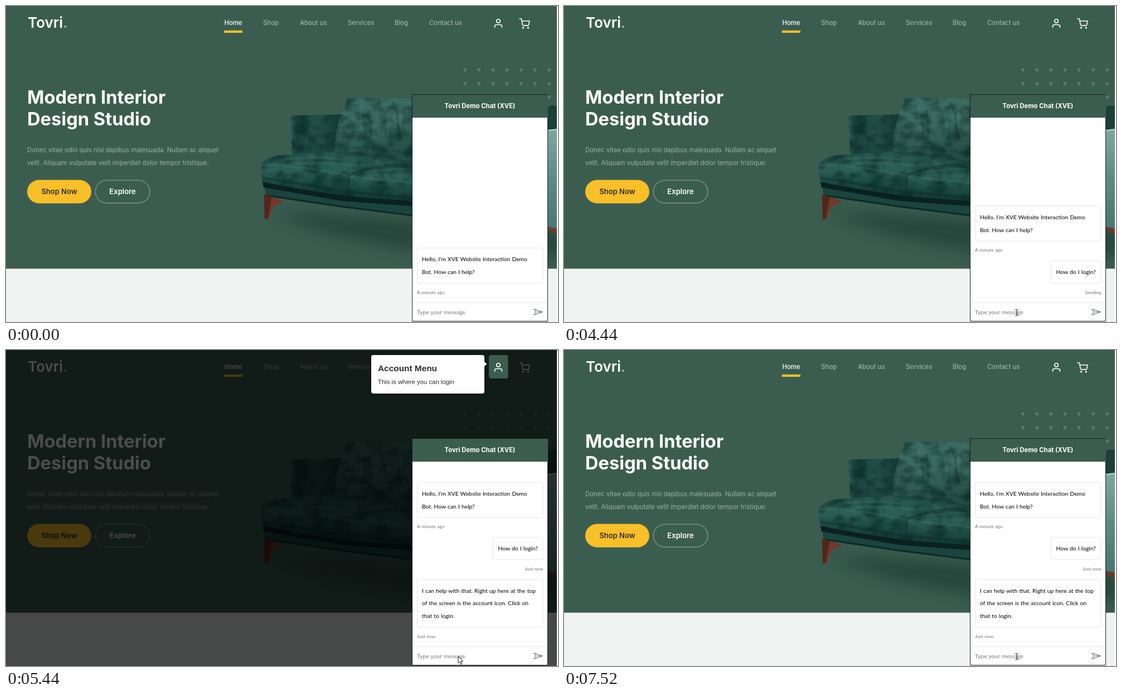
Recreate the animation shown at these times as an HTML page. Size 990x566 px, loop 8000 ms.

```html
<!DOCTYPE html>
<html lang="en">
<head>
<meta charset="utf-8">
<title>Website chat demo</title>
<style>
html, body { margin: 0; width: 100%; height: 100%; overflow: hidden; background: #fff; }
svg { display: block; width: 990px; height: 566px; }
text { white-space: pre; }
.site { font: 400 11.35px Inter, sans-serif; fill: #fff; }
.site .nav { font-weight: 500; }
.site .button { font-size: 13px; font-weight: 600; text-anchor: middle; }
.site .headline { font-size: 32.65px; font-weight: 700; }
.site .logo { font-size: 26px; font-weight: 600; }
.half { opacity: .5; }
.icon { fill: none; stroke: #fff; stroke-width: 2; stroke-linecap: round; stroke-linejoin: round; }
.popover { font: 11.35px "Liberation Sans", Arial, sans-serif; fill: #2d2d2d; filter: drop-shadow(0 1px 4px #0006); }
.chat { font: 10.3px Lato, sans-serif; word-spacing: .5px; }
.chat .title { font: 700 11.35px Inter, sans-serif; fill: #fff; text-anchor: middle; word-spacing: 0; }
.chat .time { font-size: 8.4px; fill: #6c726e; }
.chat .right { text-anchor: end; }
.chat .bubble { fill: #fff; stroke: #e6e6e6; }
.wrinkles { fill: none; stroke-linecap: round; filter: url(#soft); }
</style>
</head>
<body>
<svg viewBox="0 0 990 566">
  <defs>
    <linearGradient id="back" x1="0" y1="0" x2=".25" y2="1">
      <stop stop-color="#396960"/><stop offset=".45" stop-color="#3d6c62"/><stop offset="1" stop-color="#224c45"/>
    </linearGradient>
    <linearGradient id="arm" x1="0" x2="1">
      <stop stop-color="#2c5c54"/><stop offset=".12" stop-color="#1c463f"/><stop offset=".6" stop-color="#225048"/><stop offset="1" stop-color="#153631"/>
    </linearGradient>
    <linearGradient id="seat" x1="0" y1="0" x2="0" y2="1">
      <stop stop-color="#25544c"/><stop offset=".4" stop-color="#2c5f56"/><stop offset=".62" stop-color="#1f4e47"/><stop offset="1" stop-color="#133935"/>
    </linearGradient>
    <linearGradient id="rightArm" x1="0" y1="0" x2="0" y2="1">
      <stop stop-color="#7fa5a1"/><stop offset=".5" stop-color="#5d8a85"/><stop offset="1" stop-color="#4a7771"/>
    </linearGradient>
    <filter id="soft" x="-20%" y="-20%" width="140%" height="140%"><feGaussianBlur stdDeviation="1.3"/></filter>
    <filter id="blur" x="-30%" y="-60%" width="160%" height="220%"><feGaussianBlur stdDeviation="13"/></filter>
    <filter id="velvet" x="0" y="0" width="100%" height="100%" color-interpolation-filters="sRGB">
      <feTurbulence type="fractalNoise" baseFrequency=".035 .05" numOctaves="3" seed="4"/>
      <feColorMatrix values="0 0 0 0 .03  0 0 0 0 .15  0 0 0 0 .14  1.6 0 0 0 -.62"/>
      <feComposite in2="SourceAlpha" operator="in" result="nap"/>
      <feMerge><feMergeNode in="SourceGraphic"/><feMergeNode in="nap"/></feMerge>
    </filter>
    <clipPath id="hero"><path d="M0 0H988V470.500H0z"/></clipPath>
  </defs>

  <g class="site">
    <path fill="#eff2f1" d="M0 470H988V566H0z"/>
    <path fill="#3b5d50" d="M0 0H988V470.500H0z"/>
    <g id="dots" fill="#fff" fill-opacity=".17"></g>

    <g clip-path="url(#hero)">
      <path d="M470 368L600 374 1000 400V448L740 442 580 410z" fill="#1f3a33" opacity=".62" filter="url(#blur)"/>
      <path d="M463 323L600 344 735 358V377L600 360 466 340z" fill="#1a443e"/>
      <path d="M465 339L600 359 735 376" fill="none" stroke="#0d2926" stroke-width="3"/>
      <path d="M459 312L614 336 735 346V359L600 349 462 325z" fill="#0a211f"/>
      <g filter="url(#velvet)">
        <path d="M510 200Q511 195 520 196L604 194 592 264 513 270z" fill="url(#arm)"/>
        <path d="M612 165Q660 163 735 167V282L640 266 589 262Q590 226 600 198 607 178 612 165z" fill="url(#back)"/>
        <path d="M614 306Q640 291 735 280V350L614 341z" fill="url(#seat)"/>
        <path d="M457 284Q464 272 490 267L590 261 640 265 725 280Q660 287 614 304L615 341Q530 329 459 315z" fill="url(#seat)"/>
      </g>
      <g class="wrinkles">
        <path d="M640 170Q632 205 640 226M672 172Q690 190 684 235M712 178Q700 210 716 240" stroke="#6a978b" stroke-width="3" opacity=".2"/>
        <path d="M606 258Q640 246 728 266M650 188Q656 214 652 238M694 174Q706 196 704 220M593 262L640 266 735 281M604 196Q594 222 590 260" stroke="#123630" stroke-width="2.500" opacity=".5"/>
        <path d="M458 285Q530 285 614 304M616 305Q670 310 735 318" stroke="#55857a" stroke-width="3" opacity=".3"/>
        <path d="M615 304V341M614 304Q650 287 725 281M461 308Q540 320 610 333M620 333Q680 340 735 343" stroke="#0b2b28" stroke-width="2.500" opacity=".7"/>
        <path d="M490 276Q550 268 600 274M520 283Q560 278 630 286M650 298Q690 290 730 293" stroke="#507f75" stroke-width="4" opacity=".25"/>
      </g>
      <path d="M463 337L500 350Q481 355 476 366L472 382H464z" fill="#70392a"/>
      <path d="M463 337L477 342 469 382H464z" fill="#532619"/>
      <path d="M970 182Q980 175 988 180V400L970 394z" fill="#1b3f39"/>
      <path d="M970 222H988V400L970 395z" fill="url(#rightArm)"/>
      <path d="M970 223L988 221" stroke="#c3d6d2" stroke-width="2"/>
      <path d="M970 395L988 399V410L970 399z" fill="#70392a"/>
    </g>

    <text class="logo" x="39" y="38.7">Tovri<tspan fill-opacity=".5">.</tspan></text>
    <g class="nav">
      <text x="391.5" y="34.3">Home</text>
      <path fill="#f9bf29" d="M391 43.800H424V48H391z"/>
      <g class="half">
        <text x="461" y="34.3">Shop</text>
        <text x="527" y="34.3">About us</text>
        <text x="613" y="34.3">Services</text>
        <text x="697" y="34.3">Blog</text>
        <text x="759" y="34.3">Contact us</text>
      </g>
    </g>
    <g class="icon">
      <g transform="translate(873.3 21.3) scale(.81)">
        <path d="M20 21v-2a4 4 0 0 0-4-4H8a4 4 0 0 0-4 4v2"/><circle cx="12" cy="7" r="4"/>
      </g>
      <g transform="translate(920.2 21.9) scale(.81)">
        <path d="M1 1h4l2.68 13.39a2 2 0 0 0 2 1.61h9.72a2 2 0 0 0 2-1.61L23 6H6"/>
        <circle cx="9" cy="21" r="1"/><circle cx="20" cy="21" r="1"/>
      </g>
    </g>
    <text class="headline" x="38" y="175">Modern Interior</text>
    <text class="headline" x="38" y="214">Design Studio</text>
    <g class="half">
      <text x="38" y="262">Donec vitae odio quis nisl dapibus malesuada. Nullam ac aliquet</text>
      <text x="38" y="284.7">velit. Aliquam vulputate velit imperdiet dolor tempor tristique.</text>
    </g>
    <rect x="38" y="311.6" width="115" height="41.8" rx="20.9" fill="#f9bf29"/>
    <text class="button" x="95.5" y="337.3" fill="#2f2f2f">Shop Now</text>
    <rect x="160.3" y="312.3" width="97.6" height="40.6" rx="20.3" fill="none" stroke="#fff" stroke-opacity=".3" stroke-width="1.6"/>
    <text class="button" x="209" y="337.3">Explore</text>
  </g>

  <path id="overlay" fill-rule="evenodd" fill-opacity=".7" d="M0 0H988V566H0zM870 9h26.500a4 4 0 0 1 4 4v34a4 4 0 0 1-4 4H870a4 4 0 0 1-4-4V13a4 4 0 0 1 4-4z"/>

  <g id="popover" class="popover">
    <rect x="655" y="9" width="203" height="69" rx="4" fill="#fff"/>
    <path d="M858 21l4.500 4-4.500 4z" fill="#fff"/>
    <text x="667" y="37.600" font-size="15.4" font-weight="700">Account Menu</text>
    <text x="667" y="61">This is where you can login</text>
  </g>

  <g class="chat">
    <path fill="#fff" stroke="#000" stroke-width=".85" d="M728.5 158.500H971.500V564.500H728.500z"/>
    <path fill="#3b5d50" d="M729 159H972V200H729z"/>
    <text class="title" x="850" y="183">Tovri Demo Chat (XVE)</text>
    <g id="greeting">
      <rect class="bubble" x="737.5" y="433.500" width="225.500" height="63" rx="1.500"/>
      <text x="746" y="457.300">Hello, I’m XVE Website Interaction Demo</text>
      <text x="746" y="480">Bot. How can I help?</text>
      <text class="time" x="737" y="515.700">A minute ago</text>
    </g>
    <g id="question">
      <rect class="bubble" x="873.500" y="456.500" width="89.500" height="40" rx="1.500"/>
      <text x="882.500" y="480">How do I login?</text>
      <text id="status" class="time right" x="963.500" y="515.700"></text>
    </g>
    <g id="reply">
      <rect class="bubble" x="737.500" y="411" width="225.500" height="85.500" rx="1.500"/>
      <text x="746" y="434.600">I can help with that. Right up here at the top</text>
      <text x="746" y="457.300">of the screen is the account icon. Click on</text>
      <text x="746" y="480">that to login.</text>
      <text class="time" x="737" y="515.700">Just now</text>
    </g>
    <path d="M729 531.500H971" stroke="#e6e6e6"/>
    <text id="input" x="737" y="552.200"></text>
    <path id="caret" d="M.5 542V556" stroke="#000"/>
    <path d="M947 542.800L962.500 548 947 553.400 950 548zM950 548H962" fill="none" stroke="#66736b" stroke-width="1.100" stroke-linejoin="round"/>
  </g>

  <circle id="press" cx="810.500" cy="548" r="10" fill="#f4ee3c" style="mix-blend-mode:multiply"/>
  <path id="beam" d="M-2.500-5.500h2M.5-5.500h2M-2.500 5.500h2M.5 5.500h2M0-5V5" fill="none" stroke="#000"/>
  <path id="arrow" d="M811 548.500v12.500l2.800-2.600 2 4.600 2-.9-2-4.500h4z" fill="#fff" stroke="#000" stroke-width=".9"/>
</svg>

<script>
const LOOP = 8000;
const QUESTION = "How do I login?";
const KEY_TIMES = [2080, 2140, 2290, 2440, 2530, 2680, 2770, 2890, 3010, 3130, 3290, 3450, 3530, 3600, 3880];
const SENT = 4070, DELIVERED = 4500, REPLIED = 4620, TOUR_START = 4860, TOUR_END = 6630;
const FADE = [[4890, .2], [4920, .7], [4980, .93], [5040, 1]];

const el = id => document.getElementById(id);
const show = (id, on) => el(id).style.display = on ? "" : "none";
const within = (t, from, to) => t >= from && t < to;
const shift = (id, y) => el(id).setAttribute("transform", `translate(0 ${y})`);

for (let row = 0; row < 3; row++)
  for (let col = 0; col < 7; col++)
    el("dots").innerHTML += `<circle cx="${823 + col * 25.2}" cy="${114.3 + row * 24.5}" r="2.9"/>`;

function drawInput(t) {
  const typed = t < SENT ? QUESTION.slice(0, KEY_TIMES.filter(k => k <= t).length) : "";
  const input = el("input");
  input.textContent = typed || "Type your message";
  input.setAttribute("fill", typed ? "#000" : "#767676");
  const x = 737 + (typed ? Math.round(input.getComputedTextLength()) : 0);
  el("caret").setAttribute("transform", `translate(${x} 0)`);
  const blink = t >= 4920 && Math.floor((t - 4920) / 520) % 2 === 0;
  show("caret", within(t, 1250, 1770) || within(t, 2080, 4440) || blink);
}

function drawChat(t) {
  const replied = t >= REPLIED;
  shift("greeting", replied ? -196.5 : t >= SENT ? -75.5 : 0);
  shift("question", replied ? -121 : 0);
  show("question", t >= SENT);
  show("reply", replied);
  el("status").textContent = t < DELIVERED ? "Sending" : "Just now";
}

function drawTour(t) {
  const fade = t < TOUR_END ? FADE.reduce((value, [at, level]) => t >= at ? level : value, 0) : 0;
  el("overlay").style.opacity = fade;
  el("popover").style.opacity = fade ** .4;
}

function drawPointer(t) {
  const p = Math.min(Math.max((t - 740) / 440, 0), 1);
  const e = 1 - (1 - p) ** 2;
  const bezier = (a, b, c) => a * (1 - e) ** 2 + 2 * b * e * (1 - e) + c * e * e;
  el("beam").setAttribute("transform", `translate(${bezier(839, 828, 812)} ${bezier(574, 527, 549)})`);
  const touring = within(t, TOUR_START, 6540);
  show("beam", !touring);
  show("arrow", touring);
  show("press", within(t, 1190, 1280) || within(t, 6540, TOUR_END) || within(t, 7180, 7270));
}

const start = performance.now();
function frame() {
  const t = (performance.now() - start) % LOOP;
  drawInput(t);
  drawChat(t);
  drawTour(t);
  drawPointer(t);
  requestAnimationFrame(frame);
}
frame();
</script>
</body>
</html>
```
